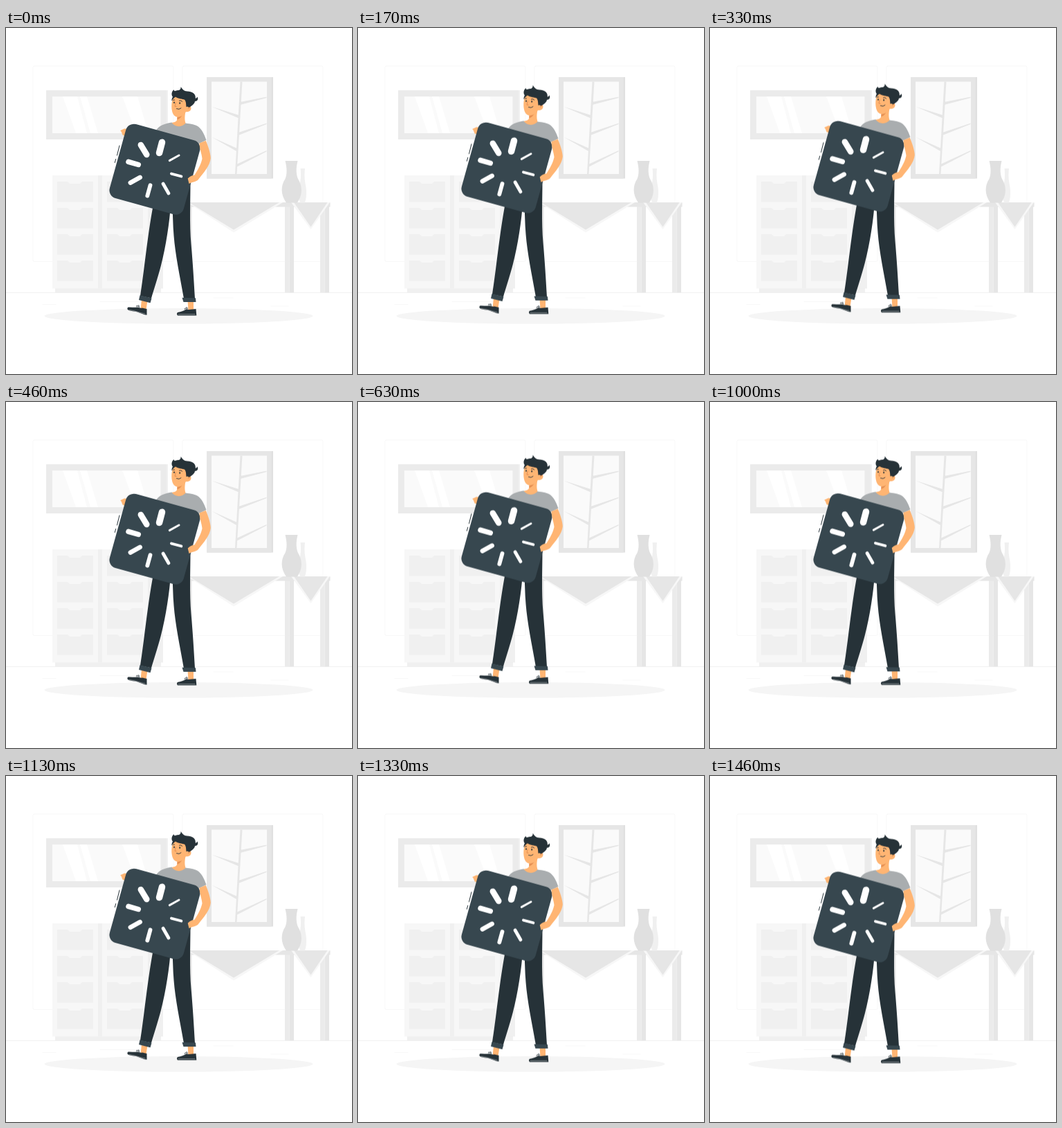
An HTML page for the animation above (1500 ms loop, 500x500 px).

```html
<!DOCTYPE html>
<html lang="en">
<head>
<meta charset="utf-8">
<title>Loading</title>
<style>
html, body { margin: 0; width: 100%; height: 100%; overflow: hidden; background: #fff; }
svg { display: block; width: 100vw; height: 100vh; }
.float { animation: float 1.5s linear infinite; }
@keyframes float { 50% { transform: translateY(-10px); } }
.line { fill: none; stroke-linecap: round; stroke-linejoin: round; }
.dark { fill: #263238; }
.slate { fill: #37474f; }
.skin { fill: #ffb573; }
</style>
</head>
<body>
<svg viewBox="0 0 500 500">
  <defs>
    <path id="drawer" d="M0 0H15L18 3H33L36 0H52V29.500H0Z" fill="#f0f0f0"/>
    <g id="column">
      <use href="#drawer" y="222"/>
      <use href="#drawer" y="260"/>
      <use href="#drawer" y="298"/>
      <use href="#drawer" y="336"/>
    </g>
    <g id="leg">
      <path d="M0 258H6.500V382.500H0Z" fill="#ebebeb"/>
      <path d="M6.500 258H13V382.500H6.500Z" fill="#e6e6e6"/>
    </g>
  </defs>

  <!-- room -->
  <g class="line" stroke="#f5f5f5" stroke-width=".7">
    <rect x="39" y="55" width="203" height="282.500" rx="2"/>
    <rect x="255" y="55" width="203" height="282.500" rx="2"/>
    <path stroke="#ebebeb" d="M0 382.400H500"/>
    <path d="M53 399.500H72M136 395.500H196M300 390H328M383 402H408"/>
  </g>

  <!-- mirror -->
  <path d="M58 90H234V161H58Z" fill="#f0f0f0"/>
  <path d="M58 90H232V161H58Z" fill="#ebebeb"/>
  <path d="M67 99H223.500V152H67Z" fill="#fafafa"/>
  <path d="M82 99H103L117 152H101ZM107 99H117L133 152H122ZM168 99H190L206 152H188Z" fill="#fff"/>

  <!-- picture -->
  <path d="M290 71H386V217.500H290Z" fill="#e0e0e0"/>
  <path d="M290 71H383.500V217.500H290Z" fill="#e6e6e6"/>
  <path d="M297 77.500H377V211H297Z" fill="#fafafa"/>
  <path d="M338.500 77.500H341.500L333.500 211H331ZM297 113.500L336.500 126V130.500ZM376.500 99.500V101L338.500 111V107ZM376.500 137.500V139L336 155V151ZM297 157.500L334 174V178.500ZM376.500 177V178.500L333 201V197Z" fill="#e6e6e6"/>

  <!-- cabinet -->
  <path d="M71 376H224V382.500H71Z" fill="#f0f0f0"/>
  <path d="M67 213H205V376.500H67Z" fill="#f7f7f7"/>
  <path d="M133 213H139V376.500H133ZM205 213H227V376.500H205Z" fill="#f0f0f0"/>
  <use href="#column" x="74"/>
  <use href="#column" x="146"/>

  <!-- table -->
  <use href="#leg" x="255.500"/>
  <use href="#leg" x="403"/>
  <use href="#leg" x="454"/>
  <path d="M256 252H468.500V258.500H256Z" fill="#e6e6e6"/>
  <path d="M262 252H400L329 295.500ZM412 252H468L440.500 291Z" fill="#f7f7f7"/>
  <path d="M264 252H395L329 291.500ZM416 252H464.500L440.500 287.500Z" fill="#e6e6e6"/>
  <path d="M425.500 203H432C431 213 431.500 219 433 227C435 237 434 246 432 252.500H425C422.500 245 422 236 424.500 227C426 219 426.500 213 425.500 203Z" fill="#f0f0f0"/>
  <path d="M403.500 192H421.500C419 202 419 211 422 218C428 228 429.500 240 421 252.500H405C396.500 240 397 228 403.500 218C406.500 211 406 202 403.500 192Z" fill="#e0e0e0"/>

  <ellipse cx="249.500" cy="416.300" rx="194" ry="11.300" fill="#f5f5f5"/>

  <g class="float">
    <!-- legs and shoes -->
    <path class="skin" d="M196 392L204.500 394L202.500 407H194.500ZM262.500 394H271V408H263.500Z"/>
    <path class="dark" d="M176.500 403.500C181 403 186 404.500 190.500 403.500C192.500 404.500 195 405 197 404.500L203.500 406V414.800C199 414.500 195 412 189 410.300C184 409 177 409 175.500 406.500C175.300 405 175.500 404 176.500 403.500Z"/>
    <path class="dark" d="M248 411C253 410 257 409 260.500 406.500C264 407.500 269 406.500 274.500 406L275.300 415.500H248C246.500 414 246.700 412 248 411Z"/>
    <path class="line" stroke="#263238" stroke-width=".8" d="M188.500 403C188 400.500 190 400.500 191 403C190.500 399.500 193 400 192.500 403.500M258.500 407C257.500 404.500 259.500 404 261 406.500C259.500 402.500 262 402.500 262.500 406"/>
    <path class="line" stroke="#fff" stroke-width=".4" d="M178 407.500C187 408.500 193 411.500 201 413M249 413.700H273"/>
    <path class="dark" d="M213 255H238C236.500 280 231 316 224 343C219 362 214 377 210 390.500L194 387C199 357 205 295 213 255Z"/>
    <path class="dark" d="M240 255L264 222H266.500C266.500 250 265 283 267.500 312C270 340 271.500 365 273 391H257C251 357 244.500 327 242.500 300C241 285 241.500 270 240 255Z"/>
    <path class="slate" d="M193.500 386.300L210.500 390.500L208.500 397.300L192 393ZM254.500 389.700L274 390.300L274.500 396H256.500Z"/>

    <!-- torso -->
    <path fill="#a9adaf" d="M239 136.500C246 138.500 253 138.500 259.500 137.500C267 138.500 274 139.500 278.500 143C284 148 287 155 289.500 162L279 167L270 190L205 175L216 150C219 143 225 139 239 136.500Z"/>
    <path class="skin" d="M247.500 122L261 114C258.500 124 257.500 131 259.500 137.500C256 142.500 246 145 239.500 137C245.500 136 247.500 134.500 247.500 130Z"/>
    <path d="M247.500 128.500C251 128 254 126 255.500 123.500C254.500 128 251 131.500 247.300 132.500Z" fill="#e58f52"/>

    <!-- head -->
    <path class="skin" d="M243 97C239.500 104 238.700 112 239.800 119C241 126 245 129.500 250 128.500C254.500 127.500 258 125 260 121C264 122 267.500 119.500 267.500 116C267.500 112.500 264.500 111 262 113L262 98Z"/>
    <path class="dark" d="M239.200 105.500C239.500 103 239.800 101 241 99.500C238.500 97 239 92 242.500 89C242.500 91 244 91.500 246 90.500C249 89.500 252.500 91 252.700 85C255 88.500 257 91.500 262 91.500C269 91.500 274 95 273.800 100.500C273.500 102 274.500 102.500 276.500 99.500C278.500 103 276.500 106 273 106C272.500 110 268.500 112 264.500 115L262.500 113.500L260.500 114C260 110 260.500 107.500 258.500 104C255 102 249 102.500 245 99.500C242.500 101 241 103 239.200 105.500Z"/>
    <g class="line" stroke="#263238" stroke-width=".9">
      <path d="M241 104.500Q242.200 103.300 243.600 104M250.500 105Q253 104 254.700 106.200"/>
      <path d="M246.500 116.700Q250.500 118.600 253 115.800"/>
    </g>
    <path class="line" stroke="#e58f52" stroke-width="1" d="M245.300 108L244 113.300L246.200 113.500M263.500 116.500Q264 114.500 266 114.500"/>
    <ellipse class="dark" cx="243" cy="107.700" rx=".9" ry="1.300"/>
    <ellipse class="dark" cx="251.200" cy="108.600" rx=".9" ry="1.300"/>

    <!-- panel -->
    <path class="skin" d="M180 146L171 145.500L165 148.300C167.500 149.500 167 152.500 169 155L175 157Z"/>
    <rect class="slate" x="-55.500" y="-55.500" width="111" height="111" rx="12" transform="translate(215 204.200) rotate(15.500)"/>
    <g class="line" stroke="#fff">
      <path stroke-width="9.500" d="M225.500 165.200L221.500 180.500"/>
      <path stroke-width="8.500" d="M194.800 169L203.300 183"/>
      <path stroke-width="7.500" d="M177 193.300L191.300 197.500"/>
      <path stroke-width="6.500" d="M179.800 223.700L193.700 215.800"/>
      <path stroke-width="5.800" d="M208.500 227.300L204.300 242.500"/>
      <path stroke-width="4.800" d="M227 225L235 239"/>
      <path stroke-width="4" d="M239 210.600L253.300 214.400"/>
      <path stroke-width="3" d="M236.300 191.600L250 184"/>
    </g>

    <!-- arm -->
    <path class="skin" d="M279.500 166.500L288.800 162.700C292 171 295.500 180 295.800 188C295 199 285 210 277.500 219.500C274 222.500 268.500 222.500 264.500 225L262.700 217.500C265.500 214.500 269 213 272.500 212.500C277 205 281.500 198 283.500 189C283 182 279.500 174 279.500 166.500Z"/>
    <path class="line" stroke="#263238" stroke-width="1" d="M164 170L160.500 184M158.700 189.500L157.300 194.500"/>
  </g>
</svg>
</body>
</html>
```
